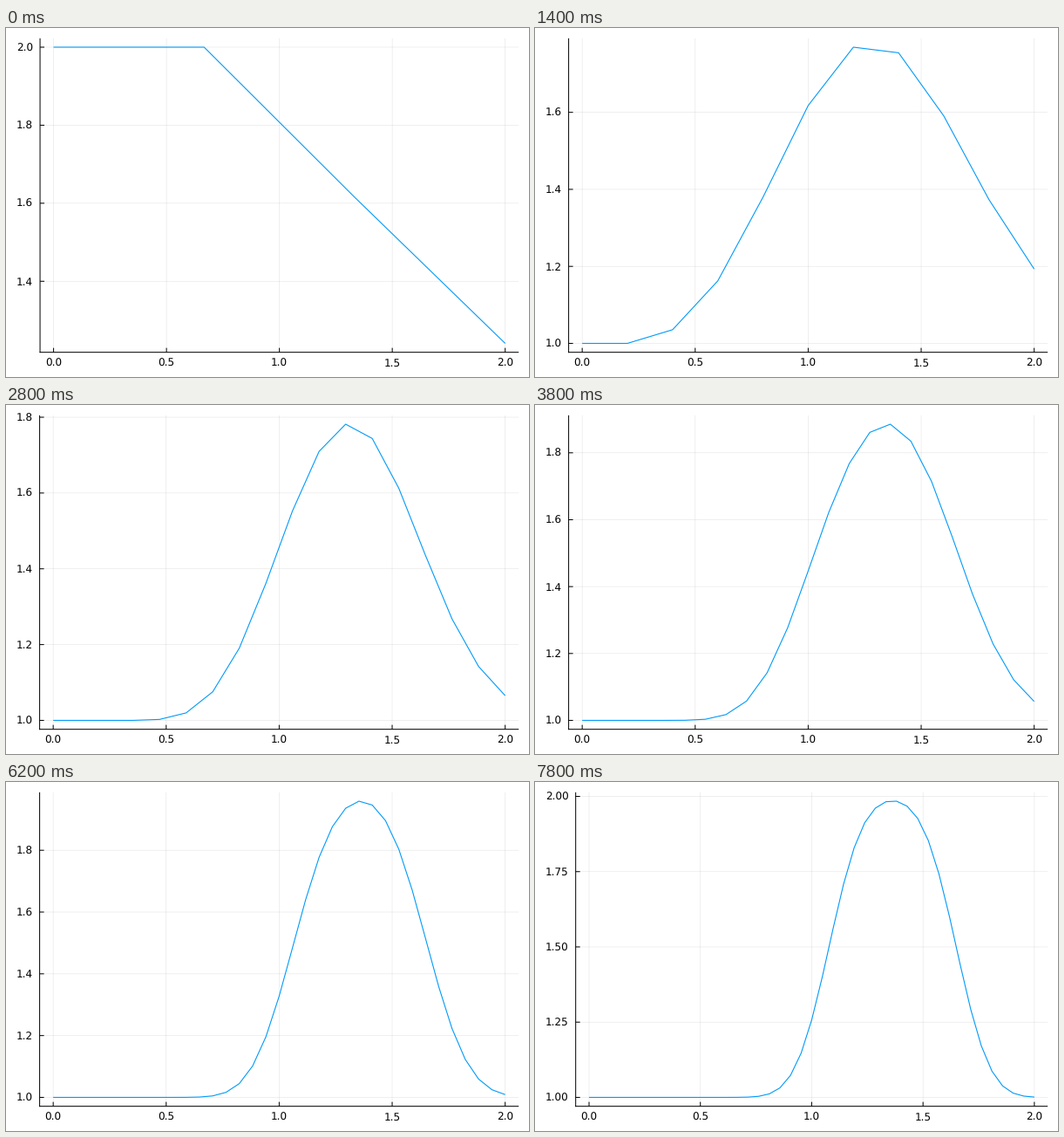
A matplotlib script that plays this animation: 600 by 400 pixels, repeating every 8000 ms.

```python
import math

import matplotlib.pyplot as plt
import numpy as np
from matplotlib.animation import FuncAnimation

W, H = 600, 400
TOP, BOTTOM, RIGHT = 11.8, 371.65, 588.2
FRAMES, INTERVAL = 40, 200
STEPS, DT, LENGTH = 25, 0.025, 2.0
PX = 0.72  # points per pixel at 100 dpi
LINE = "#009afa"
NICE = [(1, 1.0), (5, 0.9), (2, 0.7), (2.5, 0.5), (3, 0.2)]

plt.rcParams.update({
    "font.family": "DejaVu Sans",
    "text.hinting": "none",
    "path.snap": False,
    "path.simplify": False,
})


def convect(cells):
    """Upwind linear convection of a square pulse on a grid of cells."""
    u = np.ones(cells + 1)
    u[cells // 4:cells // 2 + 1] = 2
    courant = DT * cells / LENGTH
    for _ in range(STEPS):
        u[1:] -= courant * (u[1:] - u[:-1])
    return np.linspace(0, LENGTH, cells + 1), u


def widen(values):
    lo, hi = values.min(), values.max()
    pad = 0.03 * (hi - lo)
    return lo - pad, hi + pad


def pick_ticks(lo, hi):
    """Weigh tick count, coverage and roundness; return ticks and decimals."""
    best = None
    for power in (-2, -1, 0):
        for q, niceness in NICE:
            step = q * 10.0 ** power
            first, last = math.ceil(lo / step), math.floor(hi / step)
            count = last - first + 1
            if not 4 <= count <= 8:
                continue
            granularity = 1 - abs(count - 5) / 5
            coverage = 1.5 * (hi - lo) / ((count - 1) * step)
            score = granularity / 4 + coverage / 3 + niceness / 4
            key = (round(score, 9), step)
            if best is None or key > best[0]:
                decimals = max(1, -power + (q == 2.5))
                best = key, step * np.arange(first, last + 1), decimals
    return best[1], best[2]


fig = plt.figure(figsize=(W / 100, H / 100), dpi=100, facecolor="white")
ax = fig.add_axes([0, 0, 1, 1])


def stroke(xs, ys, color="black", width=1.0, **kw):
    ax.plot(xs, ys, color=color, lw=width * PX, solid_capstyle="butt", **kw)


def label(x, y, text, align):
    ax.text(x, y, text, fontsize=12 * PX, ha=align, va="baseline")


def draw(i):
    ax.clear()
    ax.set(xlim=(0, W), ylim=(H, 0))
    ax.axis("off")

    x, u = convect(i + 3)
    (x0, x1), (y0, y1) = widen(x), widen(u)
    xticks, xdec = pick_ticks(x0, x1)
    yticks, ydec = pick_ticks(y0, y1)

    # The left margin follows the widest label.
    left = 38.6 + 7.63 * (ydec - 1) + (0.45 if yticks[-1] > 1.99 else 0)

    def to_x(v):
        return left + (v - x0) / (x1 - x0) * (RIGHT - left)

    def to_y(v):
        return BOTTOM - (v - y0) / (y1 - y0) * (BOTTOM - TOP)

    for v in xticks:
        px = to_x(v)
        stroke([px, px], [TOP, BOTTOM], width=0.6, alpha=0.1)
        stroke([px, px], [BOTTOM, BOTTOM - 5])
        label(px, 387.6, f"{v:.{xdec}f}", "center")
    for v in yticks:
        py = to_y(v)
        stroke([left, RIGHT], [py, py], width=0.6, alpha=0.1)
        stroke([left, left + 5], [py, py])
        label(left - 8.3, py + 4.4, f"{v:.{ydec}f}", "right")

    stroke([left, left], [TOP, BOTTOM + 0.5])
    stroke([left - 0.5, RIGHT], [BOTTOM, BOTTOM])
    stroke(to_x(x), to_y(u), LINE, 1.1, solid_joinstyle="round")
    return []


anim = FuncAnimation(fig, draw, frames=FRAMES, init_func=lambda: [],
                     interval=INTERVAL, repeat=True, repeat_delay=0)
plt.show()
```
